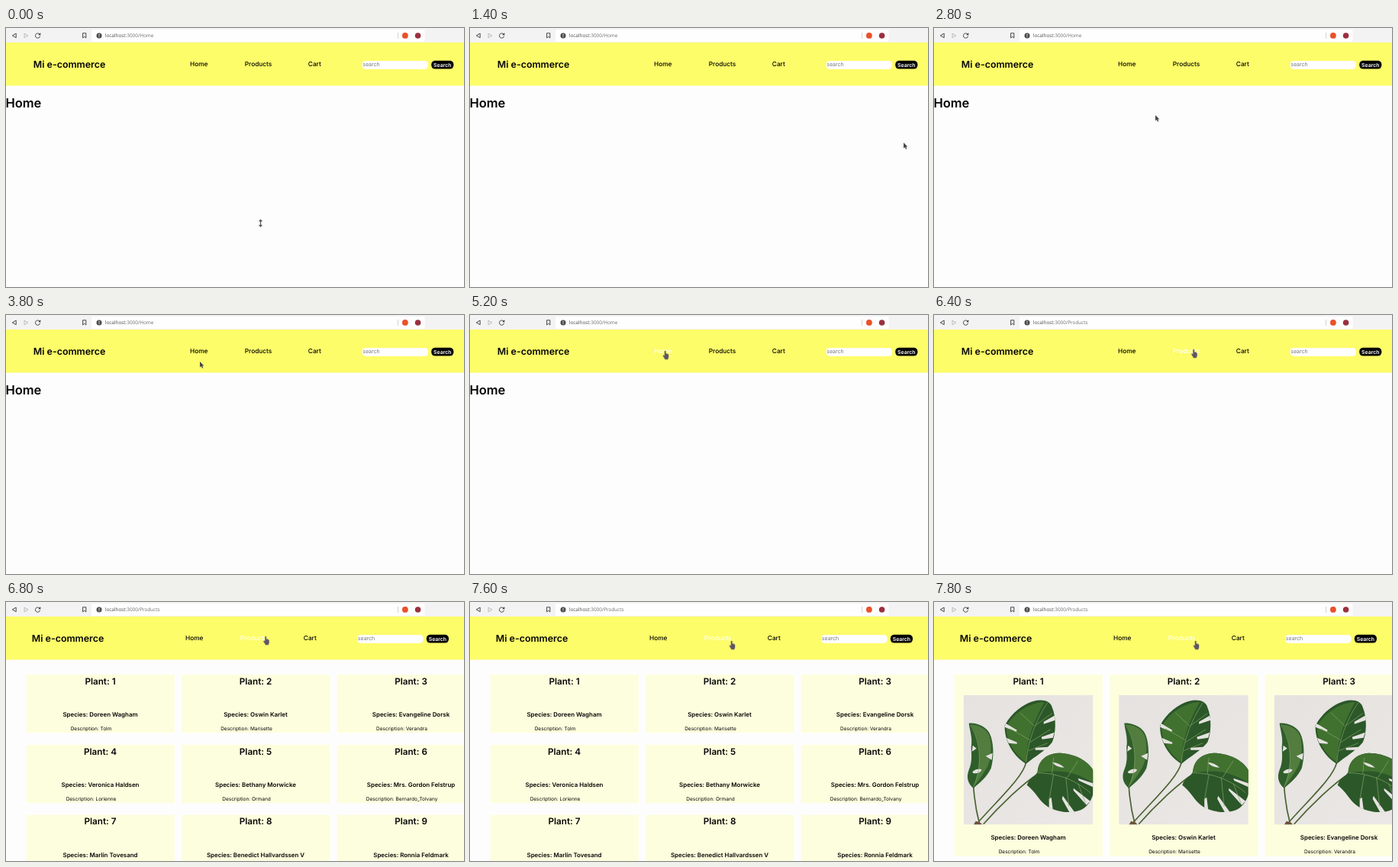
An HTML page for the animation above (8000 ms loop, 600 by 339 pixels).

```html
<!DOCTYPE html>
<html lang="en">
<head>
<meta charset="utf-8">
<title>Shop</title>
<style>
  html, body { margin: 0; width: 100%; height: 100%; overflow: hidden; background: #fefdfe; }
  svg { display: block; width: 100vw; height: 100vh; }
  text { font-family: Inter, "Open Sans", sans-serif; fill: #050505; text-rendering: geometricPrecision; }
  .bold { font-weight: 600; }
  .mid { text-anchor: middle; }
  .url { font: 6.4px "Open Sans", "Noto Sans", sans-serif; fill: #6d6d6d; }
  .url .host { fill: #484848; }
  .nav { font-size: 8.3px; font-weight: 500; }
  .nav.hover { fill: #fff; }
  .line { fill: none; stroke: #333; stroke-width: .9; stroke-linejoin: round; }
</style>
</head>
<body>
<svg id="stage" viewBox="0 0 600 339" preserveAspectRatio="none">
  <defs>
    <linearGradient id="wall" x2="1" y2="1">
      <stop offset="0" stop-color="#e5e2e0"/>
      <stop offset="1" stop-color="#eae7e5"/>
    </linearGradient>
    <clipPath id="photoEdge"><path d="M0 0H169.5V169.5H0Z"/></clipPath>
    <g id="plant" clip-path="url(#photoEdge)">
      <path fill="url(#wall)" d="M0 0H170V170H0Z"/>
      <g fill="none" stroke="#4a6333" stroke-width="1.7">
        <path d="M82 88C78 108 44 138 17 169"/>
        <path d="M98 103C80 114 50 142 26 169"/>
        <path d="M13 118C14 138 17 154 21 169"/>
      </g>
      <path fill="#70533c" d="M13 170L16 165 22 167 25 170Z"/>

      <path fill="#2c5729" d="M82 90C66 81 53 60 54 40C60 28 74 13 92 8C104 5 114 8 116 16C122 30 121 51 116 62C106 74 94 80 82 90Z"/>
      <path fill="#41712f" d="M82 88C67 78 56 60 56 42C64 26 82 11 106 9C92 34 82 60 82 88Z"/>
      <path fill="#2c5729" d="M83 118C86 108 94 108 97 100C98 86 108 77 124 76C146 76 168 88 172 104C173 122 170 139 158 148C146 156 126 155 110 146C98 138 96 128 83 118Z"/>
      <path fill="#41712f" d="M97 102C98 86 108 77 124 76C146 76 168 88 172 104L171 116C144 98 122 98 97 102Z"/>
      <path fill="#305e2b" d="M7 37C18 36 30 42 34 50C40 62 40 82 36 96C30 108 22 114 13 122C6 116 3 108 7 98C12 86 10 78 10 68C12 56 8 46 7 37Z"/>
      <path fill="#527d3f" d="M10 39C22 39 31 46 34 54C38 68 36 86 30 96C24 106 18 114 13 120C24 94 24 64 10 39Z"/>

      <g fill="#e6e3e1">
        <path d="M119 27L105 35 105 38 120 33ZM119 49L102 55 103 58 117 56ZM111 68L94 69 94 72 106 72Z"/>
        <path d="M55 37L70 46 69 48 54 42ZM56 56L70 62 70 64 59 63Z"/>
        <path d="M12 100Q19 95 24 98Q20 104 12 102ZM38 76L29 80 37 85ZM12 66L17 70 11 74Z"/>
        <path d="M171 116L150 109 151 112 171 121ZM166 139L144 122 144 125 161 144ZM146 154L130 132 129 136 139 154ZM117 150L115 134 112 136 112 147Z"/>
        <path d="M116 88Q126 89 132 95Q122 95 116 88Z"/>
      </g>
      <g fill="none" stroke="#82a564" stroke-width=".7">
        <path d="M110 10C94 34 84 62 82 88M97 102C126 102 150 114 166 128M9 39C24 64 24 96 13 120"/>
        <path d="M87 59L61 44M93 41L74 23M87 62L114 45M94 40L116 24M85 73L110 63"/>
        <path d="M116 103L118 82M136 108L150 86M118 104L112 138M134 107L138 146M150 116L160 142"/>
      </g>
    </g>
    <g id="arrow"><path fill="#474747" d="M0 0V7.6L1.8 6 3 8.8 4.3 8.2 3.1 5.6H5.4Z"/></g>
    <g id="hand"><path fill="#5f5566" stroke="#6f6576" stroke-width=".6" d="M2 .7C2-.2 3.4-.2 3.4.7V3.8C4.7 3.3 7 4 7 5.5V8C7 9.4 6.3 9.7 6.1 11H2.5C2.4 9.6.2 7.7 0 6.4C.2 5.4 1.2 5.6 2 6.7Z"/></g>
    <g id="resize"><path fill="#555" d="M2.5 0L5.2 3H3.1V7.5H5.2L2.5 10.5-.2 7.5H1.9V3H-.2Z"/></g>
  </defs>

  <path fill="#fefdfe" d="M0 0H600V339H0Z"/>
  <path fill="#f4f3f4" d="M0 0H600V19H0Z"/>
  <rect x="112" y="2" width="436.5" height="16" rx="2" fill="#fffeff"/>
  <path class="line" d="M13.2 7.1V12.7L8.3 9.9Z"/>
  <path class="line" style="stroke:#b5b3b5" d="M24 7.1V12.7L28.9 9.9Z"/>
  <path class="line" d="M44 8.2A3.1 3.1 0 1 0 44.6 10.6"/>
  <path fill="#333" d="M45.3 6.2V9.2H42.3Z"/>
  <path class="line" d="M100.6 6.8H104.8V13L102.7 11.2 100.6 13Z"/>
  <circle cx="122" cy="9.9" r="3.5" fill="#4b4b4b"/>
  <path stroke="#fff" stroke-width=".9" d="M122 7.8V10.4M122 11.1V12"/>
  <path stroke="#c9c7c9" stroke-width=".8" d="M513.5 6V14"/>
  <circle cx="522.9" cy="9.9" r="3.9" fill="#e9512b"/>
  <circle cx="539.6" cy="10" r="3.8" fill="#9a3040"/>
  <text class="url" x="129.8" y="12.3"><tspan class="host">localhost</tspan>:3000/<tspan id="route"></tspan></text>

  <path fill="#fdfc69" d="M0 19H600V75.6H0Z"/>
  <text id="brand" class="bold" y="51.9" font-size="12.4">Mi e-commerce</text>
  <g id="links">
    <text class="nav" x="241" y="50.3">Home</text>
    <text class="nav" x="312.8" y="50.3">Products</text>
    <text class="nav" x="395.8" y="50.3">Cart</text>
  </g>
  <g id="search">
    <rect x="466.5" y="42.9" width="86.5" height="11" rx="4.5" fill="#fffeff"/>
    <text x="467.2" y="50.4" font-size="7" style="fill:#777">search</text>
    <rect x="557.2" y="42.8" width="29.2" height="10.8" rx="5" fill="#050505"/>
    <text class="bold mid" x="571.8" y="50.6" font-size="6.9" style="fill:#fff">Search</text>
  </g>

  <text id="heading" class="bold" x="-.6" y="103.6" font-size="16.5">Home</text>
  <g id="bare"></g>
  <g id="full"></g>
  <use id="cursor"/>
</svg>
<script>
const LOOP = 8000;
const $ = id => document.getElementById(id);

const plants = [
  ['Doreen Wagham', 'Tolm'],
  ['Oswin Karlet', 'Marisette'],
  ['Evangeline Dorsk', 'Verandra'],
  ['Veronica Haldsen', 'Lorienne'],
  ['Bethany Morwicke', 'Ormand'],
  ['Mrs. Gordon Felstrup', 'Bernardo_Tolvany'],
  ['Marlin Tovesand', 'Ferrun'],
  ['Benedict Hallvardssen V', 'Osmund_N'],
  ['Ronnia Feldmark', 'Daphira'],
];

// time, x, y, shape
const pointer = [
  [0, 331, 250.3, 'resize'],
  [200, 384, 232, 'arrow'],
  [400, 462, 194, 'arrow'],
  [600, 534, 163, 'arrow'],
  [800, 568, 150, 'arrow'],
  [1800, 540, 162, 'arrow'],
  [2000, 474, 176, 'arrow'],
  [2200, 396, 169, 'arrow'],
  [2400, 334, 144, 'arrow'],
  [2600, 303, 123, 'arrow'],
  [2800, 290, 114, 'arrow'],
  [3000, 271, 98, 'arrow'],
  [3200, 255, 85, 'arrow'],
  [3600, 255, 72, 'arrow'],
  [3800, 254, 61, 'arrow'],
  [4000, 253, 50, 'hand'],
  [4200, 253, 47, 'hand'],
  [5400, 268, 53, 'arrow'],
  [5600, 294, 55, 'arrow'],
  [5800, 318, 50, 'hand'],
  [6000, 334, 46, 'hand'],
  [6200, 337.5, 45, 'hand'],
  [7000, 338, 46.5, 'hand'],
  [7200, 339, 48.5, 'hand'],
  [7400, 339.5, 50, 'hand'],
  [7600, 340, 51, 'hand'],
];

function buildCards(withPhoto) {
  const height = withPhoto ? 238 : 76.3;
  const drop = withPhoto ? 161 : 0;
  return plants.slice(0, withPhoto ? 3 : 9).map(([species, note], i) => {
    const x = 26.7 + (i % 3) * 203.5;
    const y = 95 + Math.floor(i / 3) * 91.8;
    const mid = x + 96.8;
    return `<rect x="${x}" y="${y}" width="194.2" height="${height}" fill="#fdfedd"/>
      <text class="bold mid" x="${mid}" y="${y + 12.7}" font-size="11.7">Plant: ${i + 1}</text>
      ${withPhoto ? `<use href="#plant" x="${x + 12}" y="${y + 26.7}"/>` : ''}
      <text class="bold mid" x="${mid}" y="${y + 55.4 + drop}" font-size="7.9">Species: ${species}</text>
      <text class="mid" x="${mid - 12}" y="${y + 73 + drop}" font-size="6.5">Description: ${note}</text>`;
  }).join('');
}

const show = (el, on) => el.setAttribute('visibility', on ? 'visible' : 'hidden');

function draw(t) {
  const [, x, y, shape] = pointer.findLast(step => step[0] <= t);
  $('cursor').setAttribute('href', '#' + shape);
  $('cursor').setAttribute('transform', `translate(${x} ${y})`);

  const hovered = shape !== 'hand' ? -1 : x < 300 ? 0 : 1;
  [...$('links').children].forEach((link, i) => link.classList.toggle('hover', i === hovered));

  const clicked = t >= 6400, listed = t >= 6800, loaded = t >= 7800;
  $('route').textContent = clicked ? 'Products' : 'Home';
  show($('heading'), !clicked);
  show($('bare'), listed && !loaded);
  show($('full'), loaded);

  // The scrollbar narrows the page once the list is there.
  $('brand').setAttribute('x', listed ? 33.8 : 35.8);
  $('links').setAttribute('transform', `translate(${listed ? -6 : 0} 0)`);
  $('search').setAttribute('transform', `translate(${listed ? -6.4 : 0} 0)`);
}

$('bare').innerHTML = buildCards(false);
$('full').innerHTML = buildCards(true);

const start = performance.now();
function tick() {
  draw((performance.now() - start) % LOOP);
  requestAnimationFrame(tick);
}
tick();
</script>
</body>
</html>
```
